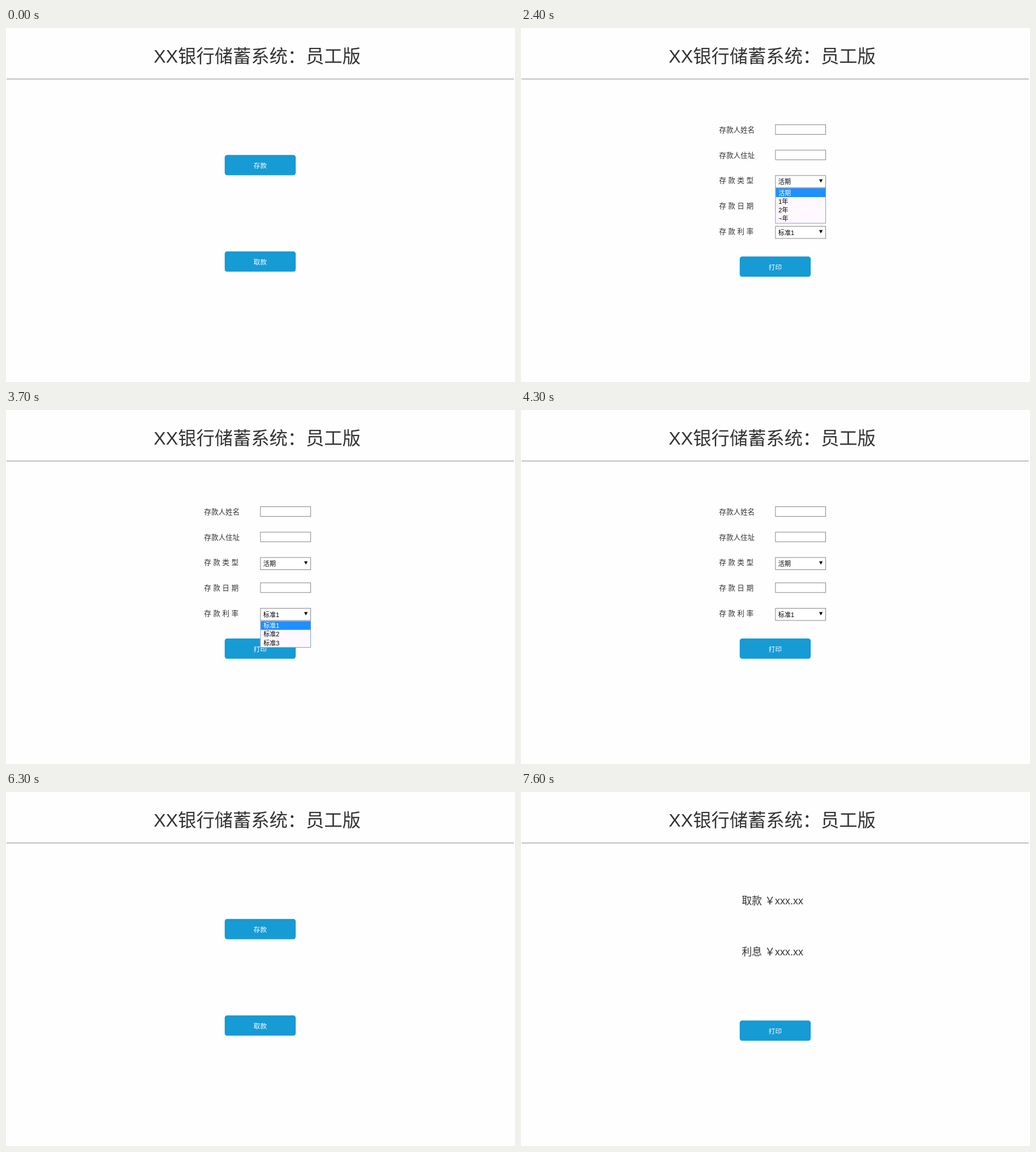
Animation, 898 px wide and 624 px high, one loop 8 s. Source, as an HTML page with a canvas:

```html
<!DOCTYPE html>
<html lang="zh-CN">
<head>
<meta charset="utf-8">
<title>储蓄系统</title>
<style>
  html, body { margin: 0; width: 100%; height: 100%; overflow: hidden; background: #fefefe; }
  canvas { display: block; }
</style>
</head>
<body>
<canvas id="stage" width="898" height="624"></canvas>
<script>
const ctx = document.getElementById('stage').getContext('2d', { alpha: false });
const LOOP = 8000;
const FONTS = '"Liberation Sans", "Noto Sans CJK SC", "Noto Sans CJK", sans-serif';
const PAPER = '#fefefe', INK = '#333', BORDER = '#797979', BLUE = '#169bd5';
const TERMS = ['活期', '1年', '2年', '~年'];
const RATES = ['标准1', '标准2', '标准3'];
const ROW = 17;

// The page is laid out 1000 units wide and shown at this zoom.
const ZOOM = 0.895;

// cy is the middle of the CJK em box
function text(str, x, cy, size, color = INK, align = 'left') {
  ctx.font = `${size}px ${FONTS}`;
  ctx.fillStyle = color;
  ctx.textAlign = align;
  ctx.fillText(str, x, cy + size * 0.38);
}

function fill(x, y, w, h, color) {
  ctx.fillStyle = color;
  ctx.fillRect(x, y, w, h);
}

function box(x, y, w, h, color = BORDER, inside = '#fff') {
  fill(x, y, w, h, inside);
  ctx.strokeStyle = color;
  ctx.lineWidth = 1;
  ctx.strokeRect(x + 0.5, y + 0.5, w - 1, h - 1);
}

function button(label, y) {
  ctx.fillStyle = BLUE;
  ctx.beginPath();
  ctx.roundRect(430, y, 140, 40, 5);
  ctx.fill();
  text(label, 500, y + 21, 13, '#fff', 'center');
}

function select(value, y) {
  box(500, y, 100, 25);
  text(value, 506, y + 12.8, 12.3, '#000');
  ctx.fillStyle = '#000';
  ctx.beginPath();
  ctx.moveTo(586.5, y + 8);
  ctx.lineTo(593.5, y + 8);
  ctx.lineTo(590, y + 14.5);
  ctx.fill();
}

function list(items, y, active) {
  box(500, y, 100, items.length * ROW + 2, '#6f94d2', '#fff8ff');
  items.forEach((item, i) => {
    const top = y + 1 + i * ROW;
    const on = i === active;
    if (on) fill(501, top, 98, ROW, '#1e90ff');
    text(item, 506.5, top + 8.5, 12.3, on ? '#fff' : '#000');
  });
}

function header() {
  text('XX银行储蓄系统：员工版', 290, 54.5, 36);
  fill(0, 100, 1000, 1, BORDER);
}

function menu() {
  button('存款', 250);
  button('取款', 440);
}

function form(t) {
  ['存款人姓名', '存款人住址', '存 款 类 型', '存 款 日 期', '存 款 利 率']
    .forEach((label, i) => text(label, 389.5, 200 + i * 50, 14));
  [190, 240, 340].forEach(y => box(500, y, 100, 20));
  select(TERMS[0], 290);
  select(RATES[0], 390);
  button('打印', 450);
  if (t >= 2400 && t < 3300) {
    const active = t < 2600 ? 0 : Math.min(3, 1 + Math.floor((t - 2600) / 100));
    list(TERMS, 315, active);
  }
  if (t >= 3700 && t < 4300) list(RATES, 415, t < 3900 ? 0 : 2);
}

function report() {
  box(350, 200, 300, 170, BORDER, PAPER);
  text('报表内容', 500, 285, 13, INK, 'center');
  text('打印成功', 500, 402, 13, INK, 'center');
  button('返回', 450);
}

function payout() {
  text('取款 ￥xxx.xx', 434, 214, 20);
  text('利息 ￥xxx.xx', 434, 314, 20);
  button('打印', 450);
}

const SCENES = [
  [0, menu], [1000, null], [1200, form], [5000, null], [5200, report],
  [6200, null], [6300, menu], [7400, null], [7600, payout]
];

function draw(t) {
  ctx.setTransform(1, 0, 0, 1, 0, 0);
  fill(0, 0, 898, 624, PAPER);
  const scene = SCENES.filter(([start]) => start <= t).pop()[1];
  if (!scene) return;
  ctx.setTransform(ZOOM, 0, 0, ZOOM, 1, 0);
  header();
  scene(t);
}

const begin = performance.now();
function tick() {
  draw((performance.now() - begin) % LOOP);
  requestAnimationFrame(tick);
}
tick();
</script>
</body>
</html>
```
